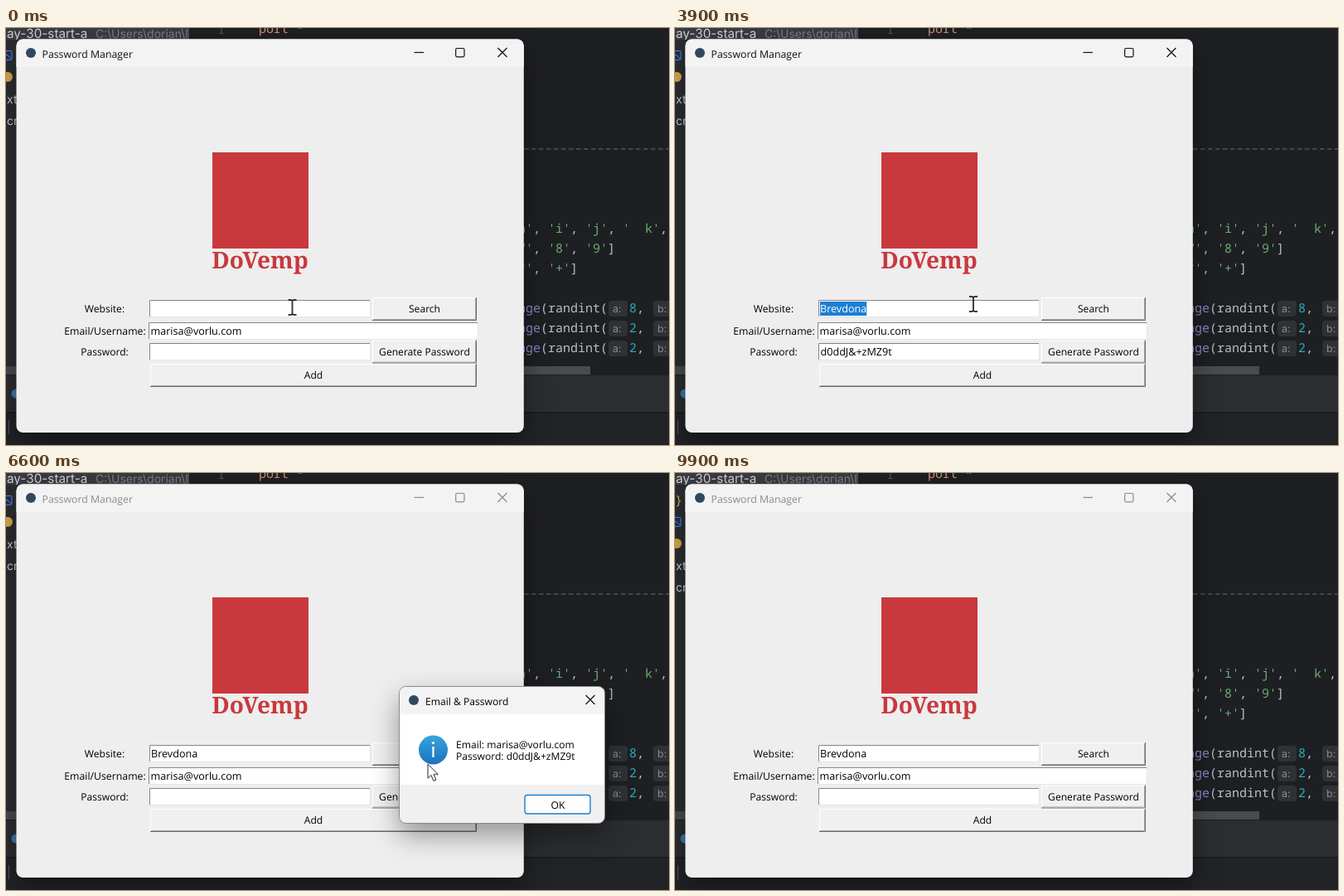
These frames come from a looping animation (800x503 px, 10000 ms). An HTML page:

```html
<!DOCTYPE html>
<html lang="en">
<head>
<meta charset="utf-8">
<title>Password Manager</title>
<style>
  html, body { margin: 0; width: 100%; height: 100%; overflow: hidden; background: #1e1f22; }
  svg { display: block; width: 800px; height: 503px; }
  text { white-space: pre; text-rendering: geometricPrecision; }
  .ui { font: 12.1px "Open Sans", "Noto Sans", sans-serif; fill: #000; }
  .mid { text-anchor: middle; }
  .entry { font-size: 12.6px; }
  .ide { font: 14px Inter, sans-serif; fill: #ced0d6; }
  .code { font: 15px "Noto Sans Mono", "DejaVu Sans Mono", monospace; fill: #bcbec4; }
  .str { fill: #6aab73; }
  .num { fill: #2aacb8; }
  .fn { fill: #8888c6; }
  .kw { fill: #cf8e6d; }
  .hint { font: 12.5px Inter, sans-serif; fill: #868a91; }
  .line { fill: none; stroke: currentColor; stroke-width: 1.2; }

  .title, .dialog, .files, .json, .pass, .site, .sel, .caret, .ok, .beam, .arrow,
  .press { animation: 10s step-end infinite; }
  .title { animation-name: focus; }
  .dialog { animation-name: dialog; }
  .files { animation-name: files; }
  .json { animation-name: json; }
  .pass { animation-name: pass; }
  .site { animation-name: site; }
  .sel { animation-name: sel; }
  .caret { animation-name: caret; }
  .ok { animation-name: ok; }
  .beam { animation-name: beam; }
  .arrow { animation-name: arrow; }
  .press { visibility: hidden; }
  .generate { animation-name: pressGenerate; }
  .add { animation-name: pressAdd; }
  .search { animation-name: pressSearch; }
  .cursor { animation: move 10s linear infinite; }
  .shadow { filter: drop-shadow(0 14px 16px rgba(0, 0, 0, .38)); }

  @keyframes focus { 0%, 90% { color: #111 } 64%, 95%, 100% { color: #8b8b8b } }
  @keyframes dialog { 0%, 90%, 100% { visibility: hidden } 64% { visibility: visible } }
  @keyframes files { 0% { transform: none } 95%, 100% { transform: translateY(26px) } }
  @keyframes json { 0% { visibility: hidden } 95%, 100% { visibility: visible } }
  @keyframes pass { 0%, 48%, 100% { visibility: hidden } 20% { visibility: visible } }
  @keyframes site { 0%, 48%, 100% { fill: #000 } 33% { fill: #fff } }
  @keyframes sel { 0%, 48%, 100% { visibility: hidden } 33% { visibility: visible } }
  @keyframes caret {
    0%, 17%, 26%, 33%, 57%, 64%, 100% { visibility: hidden }
    3%, 20%, 29%, 51%, 58.5% { visibility: visible }
  }
  @keyframes ok { 0%, 90%, 100% { fill: #fdfdfd } 76% { fill: #e0eef9 } }
  @keyframes beam {
    0%, 27%, 49.5%, 100% { visibility: visible }
    16.5%, 43%, 58.5% { visibility: hidden }
  }
  @keyframes arrow {
    0%, 27%, 49.5%, 100% { visibility: hidden }
    16.5%, 43%, 58.5% { visibility: visible }
  }
  @keyframes pressGenerate { 0%, 20.5%, 100% { visibility: hidden } 19% { visibility: visible } }
  @keyframes pressAdd { 0%, 48.5%, 100% { visibility: hidden } 47% { visibility: visible } }
  @keyframes pressSearch { 0%, 64%, 100% { visibility: hidden } 62.5% { visibility: visible } }
  @keyframes move {
    0%, .9% { transform: translate(345.5px, 337px) }
    3%, 13% { transform: translate(300px, 338px) }
    18%, 20.5% { transform: translate(500px, 392px) }
    23.5%, 25% { transform: translate(471px, 403px) }
    30%, 33% { transform: translate(225px, 339px) }
    38.5%, 40% { transform: translate(360px, 333px) }
    45%, 48% { transform: translate(400px, 419px) }
    51%, 55% { transform: translate(260px, 340px) }
    58.7%, 59.9% { transform: translate(453px, 344.5px) }
    62%, 65% { transform: translate(490px, 342px) }
    72.5%, 74% { transform: translate(631px, 410.5px) }
    80% { transform: translate(645px, 404px) }
    86%, 90.5% { transform: translate(649px, 400.5px) }
    95%, 100% { transform: translate(700px, 530px) }
  }
</style>
</head>
<body>
<svg viewBox="0 0 800 503">
  <defs>
    <linearGradient id="blue" x2="0" y2="1">
      <stop stop-color="#35a6dc"/><stop offset="1" stop-color="#1d70bd"/>
    </linearGradient>
    <clipPath id="pathClip"><path d="M0 0H220V14H0z"/></clipPath>
    <g id="call">
      <text class="code" x="618" y="343"><tspan class="fn">nge</tspan>(randint(</text>
      <rect x="727" y="329" width="23" height="19" rx="4" fill="#2f3135"/>
      <text class="hint" x="732" y="343">a:</text>
      <text class="code" x="761" y="343">,</text>
      <rect x="781" y="329" width="24" height="19" rx="4" fill="#2f3135"/>
      <text class="hint" x="786" y="343">b:</text>
    </g>
    <path id="closeX" class="line" d="M-5.5-5.5l11 11m0-11l-11 11"/>
  </defs>

  <!-- Editor behind the window -->
  <rect width="800" height="503" fill="#1e1f22"/>
  <rect width="221" height="408" fill="#2b2d30"/>
  <rect width="221" height="14" fill="#393b40"/>
  <g clip-path="url(#pathClip)">
    <text class="ide" x="1" y="12" style="font-size:15.3px">ay-30-start-a</text>
    <text class="ide" x="108" y="12" style="fill:#7a7e85">C:\Users\dorian\l</text>
  </g>
  <rect x="219" width="2" height="14" fill="#4b4d51"/>
  <text class="code" x="255" y="7" style="fill:#4b5059">1</text>
  <text class="code" x="305" y="6"><tspan class="kw">port</tspan> *</text>

  <g class="files">
    <text class="json code" x="0" y="12" style="fill:#d6ae58">}</text>
    <rect x="-5" y="27.5" width="12" height="11" rx="1.5" fill="#25324d" stroke="#548af7"/>
    <path d="M-3 37l4-5 5 5" fill="none" stroke="#548af7"/>
    <circle cx="2" cy="59" r="6" fill="#d9a94a"/>
    <text class="ide" x="1" y="91">xt</text>
    <text class="ide" x="1" y="117">cr</text>
  </g>

  <path d="M625 146H800" stroke="#6b6d70" stroke-dasharray="5.5 3.5"/>
  <text class="code" x="618" y="247"><tspan class="str">h'</tspan>, <tspan class="str">'i'</tspan>, <tspan class="str">'j'</tspan>, <tspan class="str">'  k'</tspan>,</text>
  <text class="code" x="618" y="271"><tspan class="str">7'</tspan>, <tspan class="str">'8'</tspan>, <tspan class="str">'9'</tspan>]</text>
  <text class="code" x="618" y="295"><tspan class="str">*'</tspan>, <tspan class="str">'+'</tspan>]</text>
  <use href="#call"/><use href="#call" y="24"/><use href="#call" y="48"/>
  <g class="code num">
    <text class="num" x="752" y="343">8</text>
    <text class="num" x="752" y="367">2</text>
    <text class="num" x="752" y="391">2</text>
  </g>
  <rect x="0" y="408" width="705" height="10" fill="#4a4b4e"/>
  <path d="M0 419H800V503H0z" fill="#2b2d30"/>
  <path d="M0 464H800" stroke="#1b1c1f" stroke-width="2"/>
  <path d="M0 465H800V503H0z" fill="#222327"/>
  <circle cx="12" cy="441" r="5.5" fill="#3b78a8"/>
  <path d="M3.5 473V490" stroke="#55575b"/>

  <!-- Main window -->
  <rect class="shadow" x="12.5" y="13.5" width="612.3" height="474.5" rx="8" fill="#eee"/>
  <path d="M12.5 47V21.5a8 8 0 0 1 8-8H616.8a8 8 0 0 1 8 8V47z" fill="#f3f3f3"/>
  <circle cx="30" cy="30" r="6" fill="#30485e"/>
  <g class="title">
    <text class="ui" x="43.5" y="35.5" style="font-size:12.3px;fill:currentColor">Password Manager</text>
    <path class="line" d="M492.5 29.5H504"/>
    <rect class="line" x="542.7" y="24.5" width="10.3" height="10.3" rx="1.5"/>
    <use href="#closeX" x="599" y="29.5"/>
  </g>
  <rect x="249" y="150" width="116" height="116" fill="#c9383d"/>
  <text class="mid" x="306.5" y="290" fill="#c9383d" style="font:bold 28px 'Noto Serif',serif">DoVemp</text>

  <g class="ui mid">
    <text x="119" y="343">Website:</text>
    <text x="119.5" y="369.5" style="font-size:12.3px">Email/Username:</text>
    <text x="119" y="395">Password:</text>
  </g>
  <g id="fields"></g>
  <g class="ui entry">
    <rect class="sel" id="sel" x="175" y="330" height="17" fill="#1c7ed6"/>
    <text class="site" id="site" x="175" y="343"></text>
    <rect class="caret" id="caret" y="330" width="2" height="17" fill="#000"/>
    <text x="174.5" y="369.5">marisa@vorlu.com</text>
    <text class="pass" x="175.5" y="395">d0ddJ&amp;+zMZ9t</text>
  </g>

  <!-- Result dialog -->
  <g class="dialog">
    <rect class="shadow" x="474.5" y="257.5" width="248" height="165" rx="8" fill="#f0f0f0" stroke="#8a8a8a"/>
    <path d="M475 291V266a8 8 0 0 1 8-8H714a8 8 0 0 1 8 8V291z" fill="#f3f3f3"/>
    <rect x="475" y="291" width="247" height="85" fill="#fff"/>
    <circle cx="492" cy="274" r="6" fill="#30485e"/>
    <use href="#closeX" x="705" y="273.5" color="#111"/>
    <circle cx="515.5" cy="334" r="17.5" fill="url(#blue)"/>
    <circle cx="515.5" cy="325.5" r="1.6" fill="#fff"/>
    <path d="M515.5 330V343" stroke="#fff" stroke-width="2.2"/>
    <g class="ui">
      <text x="506" y="279.5">Email &amp; Password</text>
      <text x="543" y="331.5">Email: marisa@vorlu.com</text>
      <text x="543" y="346">Password: d0ddJ&amp;+zMZ9t</text>
      <rect class="ok" x="626" y="388.5" width="79" height="22.5" rx="3" stroke="#1b7fd0" stroke-width="1.4"/>
      <text class="mid" x="666" y="404.5">OK</text>
    </g>
  </g>

  <g class="cursor">
    <path class="beam" d="M-5-9h3.5l1.5 1 1.5-1H5M0-8V8M-5 9h3.5L0 8l1.5 1H5" fill="none" stroke="#000" stroke-width="1.5"/>
    <path class="arrow" d="M0 0V17l4-3.6 3 6.8 3-1.3-3-6.6h5.4z" fill="#fff" stroke="#222" stroke-linejoin="round"/>
  </g>
</svg>
<script>
  const LOOP = 10000, NAME = "Brevdona";
  const $ = id => document.getElementById(id);

  const box = (x, y, w, h, fill, light, dark) =>
    `<rect x="${x}" y="${y}" width="${w}" height="${h}" fill="${fill}"/>
     <path d="M${x + .5} ${y + h}V${y + .5}H${x + w}" fill="none" stroke="${light}"/>
     <path d="M${x} ${y + h - .5}H${x + w - .5}V${y}" fill="none" stroke="${dark}"/>`;

  const entry = (x, y, w) => box(x, y, w, 21, "#fff", "#858585", "#e6e6e6");

  const button = (x, y, w, label, name) =>
    box(x, y, w, 28, "#f0f0f0", "#fff", "#696969") +
    `<path d="M${x + 1} ${y + 26.5}H${x + w - 1.5}V${y + 1}" fill="none" stroke="#a8a8a8"/>
     <g class="press ${name}">${box(x, y, w, 28, "#f0f0f0", "#696969", "#fff")}</g>
     <text class="ui mid" x="${x + w / 2}" y="${y + 18}">${label}</text>`;

  $("fields").innerHTML =
    entry(173, 328, 267) + entry(172, 355, 398) + entry(173, 380, 267) +
    button(442, 325, 126, "Search", "search") +
    button(442, 376.5, 126, "Generate Password", "generate") +
    button(174, 405, 394, "Add", "add");

  // Typed once, cleared by Add, then pasted back.
  function typed(t) {
    if (t >= 4800) return t < 5500 ? 0 : NAME.length;
    return Math.max(0, Math.min(NAME.length, Math.floor((t - 400) / 100)));
  }

  function draw() {
    const site = $("site");
    site.textContent = NAME.slice(0, typed(performance.now() % LOOP));
    const width = site.getComputedTextLength();
    $("caret").setAttribute("x", 175 + width - .5);
    $("sel").setAttribute("width", width);
    requestAnimationFrame(draw);
  }
  draw();
</script>
</body>
</html>
```
